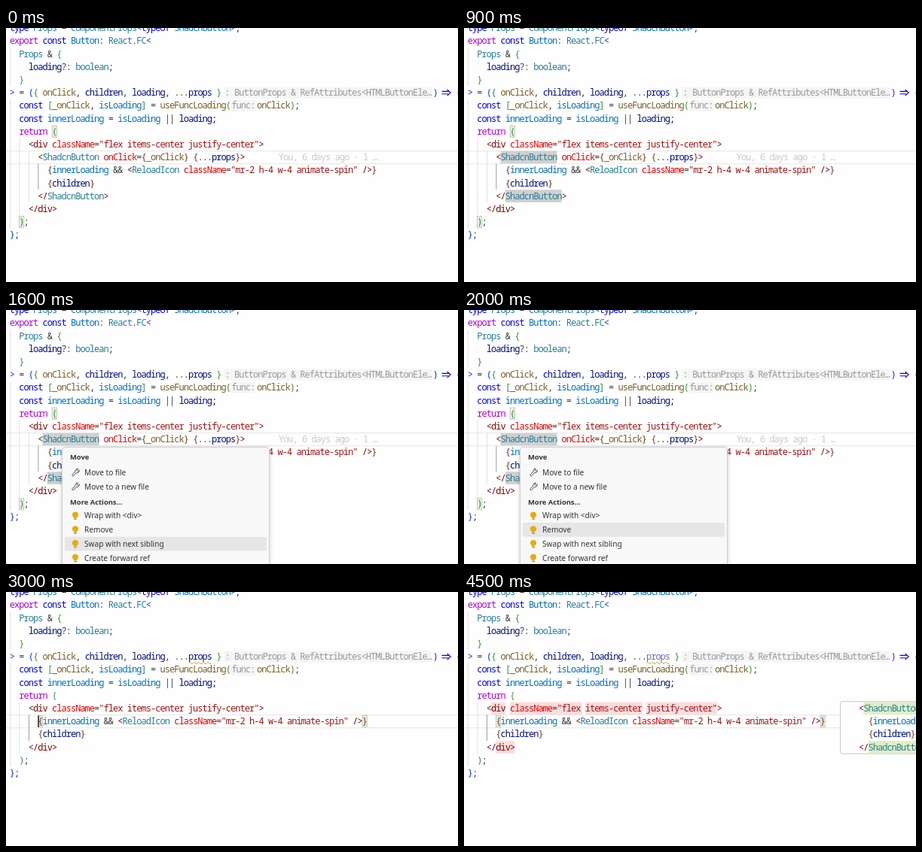
Animation of 600x338 px, one loop 4600 ms. Source, as an HTML page:

```html
<!DOCTYPE html>
<html lang="en">
<head>
<meta charset="utf-8">
<title>Editor refactoring</title>
<style>
  html, body { margin: 0; width: 100%; height: 100%; overflow: hidden; background: #fefefe; }
  svg { display: block; width: 100vw; height: 100vh; }
  text { white-space: pre; }
  .code { font: 12px "Noto Sans Mono", "DejaVu Sans Mono", monospace; font-stretch: condensed; font-variant-ligatures: none; }
  .item { font: 10.1px "Noto Sans", "Open Sans", sans-serif; fill: #333; }
  .head { font: 700 9.4px "Noto Sans", "Open Sans", sans-serif; fill: #333; }
</style>
</head>
<body>
<svg id="stage" viewBox="0 0 600 338" xmlns="http://www.w3.org/2000/svg"></svg>
<script>
const LOOP = 4600, CELL = 6.24, LEFT = 4.8, ROW = 17.2;
const stage = document.getElementById('stage');

// Colour keys used in the code markup: ~key followed by the text
const INK = {
  k: '#0000ff', c: '#af00db', t: '#267f99', v: '#001080', b: '#0070c1', f: '#795e26',
  g: '#800000', a: '#e50000', s: '#a31515', d: '#3b3b3b',
  1: '#0431fa', 2: '#319331', 3: '#7b3814', h: '#999999', y: '#c9c9c9'
};

const colX = col => LEFT + col * CELL;
const rowTop = row => row * ROW - ROW / 2;
const escape = s => s.replace(/&/g, '&amp;').replace(/</g, '&lt;').replace(/>/g, '&gt;');

function code(row, col, markup) {
  return markup.split('~').slice(1).map(part => {
    const str = part.slice(1), x = colX(col);
    col += str.length;
    return `<text class="code" x="${x.toFixed(2)}" y="${(row * ROW + 4.1).toFixed(2)}" fill="${INK[part[0]]}">${escape(str)}</text>`;
  }).join('');
}

const rect = (x, y, w, h, fill, more = '') =>
  `<rect x="${x}" y="${y}" width="${w}" height="${h}" fill="${fill}" ${more}/>`;
const mark = (row, col, n, fill) => rect(colX(col), rowTop(row) + .3, n * CELL, 16.6, fill);
const bracket = (row, col) =>
  rect(colX(col) + .2, rowTop(row) + 1, CELL, 15.4, '#e4efe2', 'stroke="#b9c2b6" stroke-width=".8"');
const guide = (col, from, to, color = '#dedede') =>
  rect(colX(col) + .2, rowTop(from), .9, (to - from + 1) * ROW, color);
const group = (id, ...parts) => `<g id="${id}">${parts.join('')}</g>`;

const reload = '~3{~binnerLoading~d && ~g<~tReloadIcon ~aclassName~d=~s"mr-2 h-4 w-4 animate-spin" ~g/>~3}';
const children = '~3{~vchildren~3}';

const common = [
  rect(0, 163.2, 600, 1, '#e6e6e6'),
  rect(0, 180.3, 600, 1, '#e6e6e6'),
  guide(0, 2, 4),
  rect(289.5, 78.6, 276, 15, '#f5f5f5', 'rx="2"'),
  rect(298.5, 95.8, 33, 15, '#f5f5f5', 'rx="2"'),
  code(0, 0, '~ktype ~tProps ~d= ~tComponentProps~1<~ktypeof ~bShadcnButton~1>~d;'),
  code(1, 0, '~cexport ~kconst ~bButton~d: ~tReact~d.~tFC~1<'),
  code(2, 2, '~tProps ~d& ~2{'),
  code(3, 4, '~vloading~d?: ~tboolean~d;'),
  code(4, 2, '~2}'),
  code(5, 0, '~1>~d = ~1(~2{ ~fonClick~d, ~vchildren~d, ~vloading~d, ...'),
  code(5, 44, '~2}'),
  code(5, 45.8, '~h: ButtonProps & RefAttributes<HTMLButtonEle…'),
  code(5, 90, '~1)'),
  code(5, 95, '~1{'),
  '<path d="M578.5 84.4h9M578.5 87.8h9M585.6 82l4.6 4.1-4.6 4.1" fill="none" stroke="#0000ff" stroke-width="1.1"/>',
  code(6, 2, '~kconst ~2[~f_onClick~d, ~bisLoading~2] ~d= ~fuseFuncLoading~2('),
  code(6, 47.2, '~hfunc:'),
  code(6, 52.6, '~fonClick~2)~d;'),
  code(7, 2, '~kconst ~binnerLoading ~d= ~bisLoading ~d|| ~vloading;'),
].join('');

const openDiv = code(9, 4, '~g<div ~aclassName~d=~s"flex items-center justify-center"~g>');
const ret = code(8, 2, '~creturn ~2(');

const before = group('before',
  guide(0, 6, 15), guide(2, 9, 14), guide(4, 10, 13), guide(6, 11, 12, '#939393'),
  bracket(8, 9), bracket(15, 2),
  group('words', mark(10, 7, 12, '#cfd1d1'), mark(13, 8, 12, '#cfcfcf')),
  ret, openDiv,
  code(10, 6, '~g<~tShadcnButton ~aonClick~d=~3{~f_onClick~3} {~d...~vprops~3}~g>'),
  code(10, 57.2, '~yYou, 6 days ago · 1 …'),
  code(11, 8, reload), code(12, 8, children),
  code(13, 6, '~g</~tShadcnButton~g>'),
  code(14, 4, '~g</div>'), code(15, 2, '~2)~d;'), code(16, 0, '~1}~d;'));

const red = '#ffdcdc', green = '#def0c4';
const after = group('after',
  guide(0, 6, 13), guide(2, 9, 12), guide(4, 10, 11, '#939393'),
  bracket(10, 6), bracket(10, 75),
  group('removed', mark(9, 5, 3, red), mark(9, 9, 15.3, red), mark(9, 25, 12.2, red),
    mark(9, 38, 15, red), mark(12, 6, 4, red)),
  ret, openDiv, code(10, 6, reload), code(11, 6, children),
  code(12, 4, '~g</div>'), code(13, 2, '~2)~d;'), code(14, 0, '~1}~d;'),
  '<path id="squiggle" d="M242.5 94.6' + 'q1.5 -2.6 3 0t3 0'.repeat(5) + '" fill="none" stroke="#cfa02c" stroke-width="1"/>',
  rect(42.4, 164.5, 1.4, 15.4, '#111', 'id="caret"'));

const popup = group('popup',
  rect(499.5, 145.8, 110, 69.4, '#fefefe', 'rx="3" stroke="#c6c6c6"'),
  mark(9, 84.2, 14, green), mark(12, 85.2, 14, green),
  code(9, 83.2, '~g<~tShadcnButton'), code(10, 85.2, '~3{~binnerLoading'),
  code(11, 85.2, children), code(12, 83.2, '~g</~tShadcnButton~g>'));

const wrench = y => `<path transform="translate(87 ${y - 5.5})" d="M1 8.3L5 4.6C4.4 2.4 6.2.4 8.6.9L6.9 2.7l1.5 1.5L10.2 2.5C10.7 5 8.6 6.8 6.5 6.1L2.8 10.1C1.5 11 .1 9.5 1 8.3z" fill="none" stroke="#444" stroke-width=".95"/>`;
const bulb = y => `<path d="M92 ${y - 5.2}a4 4 0 0 1 2.3 7.3v1.2h-4.6v-1.2a4 4 0 0 1 2.3-7.3z" fill="#e5ac0c"/>`
  + rect(90.2, y + 3.9, 3.6, 1.6, '#c2920f', 'rx=".7"');
const label = (cls, x, y, str) => `<text class="${cls}" x="${x}" y="${y + 3.7}">${escape(str)}</text>`;

const ITEMS = [
  [216, wrench, 'Move to file'], [234.8, wrench, 'Move to a new file'],
  [273.6, bulb, 'Wrap with <div>'], [292.4, bulb, 'Remove'],
  [311.1, bulb, 'Swap with next sibling'], [329.9, bulb, 'Create forward ref']
];
const menu = group('menu',
  rect(74.5, 182.5, 275, 170, '#f8f8f8', 'rx="4" stroke="#cecece" filter="url(#shade)"'),
  rect(78, 0, 268, 18.6, '#e6e6e6', 'id="pick" rx="3"'),
  label('head', 85, 195.6, 'Move'), label('head', 85, 254.8, 'More Actions...'),
  ...ITEMS.map(([y, icon, str]) => icon(y) + label('item', 104, y, str)));

stage.innerHTML = '<defs><filter id="shade" x="-10%" y="-10%" width="120%" height="120%">'
  + '<feDropShadow dx="0" dy="1" stdDeviation="2.5" flood-color="#000" flood-opacity=".2"/></filter></defs>'
  + common + group('props', code(5, 38, '~vprops')) + before + after + popup + menu;

// Fit the monospaced advance to the editor's cell
const probe = stage.querySelector('.code');
const advance = probe.getComputedTextLength() / probe.textContent.length;
stage.querySelectorAll('.code').forEach(el => { el.style.letterSpacing = (CELL - advance).toFixed(3) + 'px'; });

const $ = id => document.getElementById(id);
const show = (id, on) => $(id).setAttribute('visibility', on ? 'inherit' : 'hidden');
const toggle = (id, on) => $(id).setAttribute('display', on ? 'inline' : 'none');

function draw(t) {
  const edited = t >= 2600, hinted = t >= 3200;
  toggle('before', !edited);
  toggle('after', edited);
  show('words', t >= 600 && t < 2600);
  toggle('menu', t >= 1000 && t < 2400);
  const pick = t < 1300 ? 0 : t < 1400 ? 5 : t < 1900 ? 4 : 3;
  $('pick').setAttribute('y', ITEMS[pick][0] - 9.3);
  show('squiggle', t >= 2900);
  show('caret', (t - 2700 + 1000) % 1000 < 500);
  show('removed', hinted);
  toggle('popup', hinted);
  $('props').setAttribute('opacity', hinted ? .6 : 1);
}

const start = performance.now();
function tick() {
  draw((performance.now() - start) % LOOP);
  requestAnimationFrame(tick);
}
tick();
</script>
</body>
</html>
```
